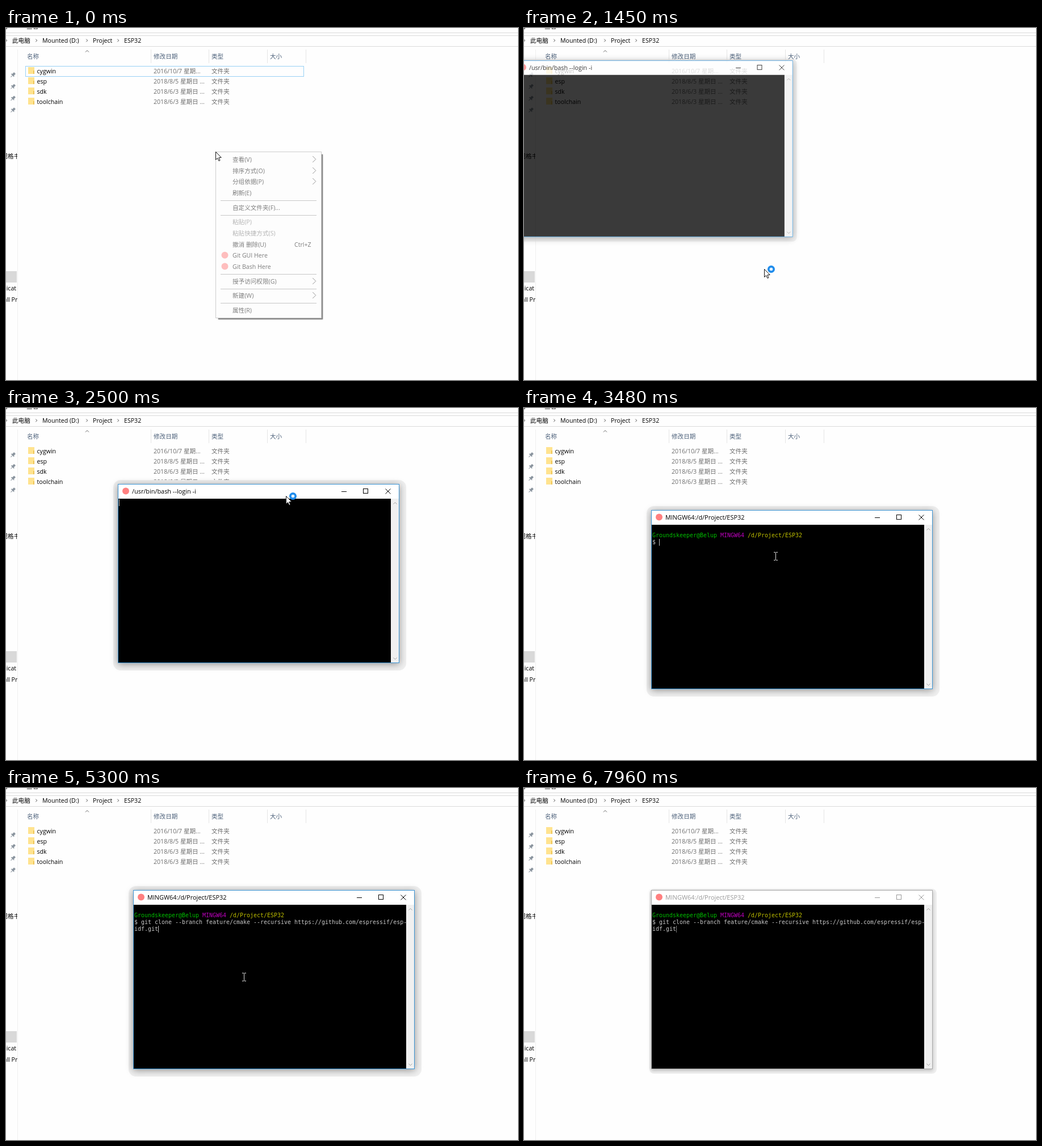
An HTML page with a canvas for the animation above (8.14 s loop, 902 px wide and 621 px high).

```html
<!DOCTYPE html>
<html lang="zh-CN">
<head>
<meta charset="utf-8">
<title>Git Bash</title>
<style>
html, body { margin: 0; width: 100%; height: 100%; overflow: hidden; background: #fefefe; }
canvas { display: block; }
</style>
</head>
<body>
<canvas id="stage" width="902" height="621"></canvas>
<script>
const W = 902, H = 621, LOOP = 8140;
const UI = '"Open Sans","Noto Sans CJK SC","Noto Sans CJK",sans-serif';
const MONO = '9.97px "DejaVu Sans Mono",monospace';
const LOGO = '#ff8080';
const page = document.getElementById('stage').getContext('2d');
const layer = Object.assign(document.createElement('canvas'), { width: W, height: H }).getContext('2d');
let g = page;

// Pointer moves: start, end, then the place reached
const MOVES = [
  [180, 790, 423, 425],   // to the menu entry
  [1430, 2140, 277, 76],  // to the title bar
  [2230, 2500, 493, 155], // drag
  [2680, 2950, 520, 201], // drag on
  [3040, 3400, 443, 261],
  [4220, 4760, 419, 333],
  [5310, 5750, 350, 268],
  [6210, 6570, 797, 583],
  [6760, 7120, 873, 640], // off the stage
];

const clamp = (v, lo, hi) => Math.min(hi, Math.max(lo, v));
const easeOut = k => 1 - (1 - k) ** 3;
const tick = t => t - (t - 70) % 90;

function pointerAt(t) {
  let x = 369, y = 218;
  for (const [start, end, toX, toY] of MOVES) {
    const k = easeOut(clamp((t - start) / (end - start), 0, 1));
    x += (toX - x) * k;
    y += (toY - y) * k;
  }
  return [Math.round(x), Math.round(y)];
}

function text(s, x, y, color = '#000', font = '10.6px ' + UI) {
  g.font = font;
  g.fillStyle = color;
  g.fillText(s, x, y);
}
function box(x, y, w, h, color) {
  g.fillStyle = color;
  g.fillRect(x, y, w, h);
}
function frame(x, y, w, h, color) {
  g.strokeStyle = color;
  g.lineWidth = 1;
  g.strokeRect(x + .5, y + .5, w - 1, h - 1);
}
function line(points, color) {
  g.beginPath();
  points.forEach(([x, y]) => g.lineTo(x, y));
  g.strokeStyle = color;
  g.lineWidth = 1;
  g.stroke();
}
function dot(x, y, r, color) {
  g.beginPath();
  g.arc(x, y, r, 0, 7);
  g.fillStyle = color;
  g.fill();
}
// Chevron centred on x, y, pointing along dx, dy
function chevron(x, y, dx, dy, size, color) {
  const a = size * dx / 2, b = size * dy / 2;
  line([[x - a - 2 * b, y - b - 2 * a], [x + a, y + b], [x - a + 2 * b, y - b + 2 * a]], color);
}

function pin(y) {
  g.save();
  g.translate(12, y);
  g.rotate(Math.PI / 4);
  box(-2, -5, 4, 5, '#8a949e');
  box(-3.5, -.5, 7, 1.5, '#8a949e');
  box(-.5, 0, 1, 5, '#8a949e');
  g.restore();
}

function drawExplorer(selected) {
  box(0, 0, W, H, '#fefefe');
  text('享', -4, 1);
  text('查看', 36, 1);
  for (const y of [8, 13, 32]) box(0, y, W, 1, '#dadada');
  [['此电脑', 11], ['Mounted (D:)', 64], ['Project', 153], ['ESP32', 208]].forEach(([name, x]) => {
    chevron(x - 10.5, 22, 1, 0, 2.4, '#555');
    text(name, x, 26);
  });

  box(20, 38, 1, H, '#f0f0f0');
  for (let i = 0; i < 4; i++) pin(83 + 20.7 * i);
  box(0, 429, 19, 20, '#d9d9d9');
  g.save();
  g.beginPath();
  g.rect(0, 0, 20, H);
  g.clip();
  text('规格书', -7.5, 230);
  text('licat', -2, 463);
  text('all Pr', -4.5, 483);
  g.restore();

  [['名称', 37], ['修改日期', 260], ['类型', 362], ['大小', 465], ['', 533]].forEach(([name, x], i) => {
    text(name, x, 54, '#4c607a');
    if (i) box(x - 5, 38, 1, 24, '#e5e5e5');
  });
  chevron(143, 41, 0, -1, 3, '#666');
  [['cygwin', '2016/10/7 星期...'], ['esp', '2018/8/5 星期日 ...'],
   ['sdk', '2018/6/3 星期日 ...'], ['toolchain', '2018/6/3 星期日 ...']].forEach(([name, date], i) => {
    const y = 80 + 18 * i;
    box(39, y - 11, 11, 12, '#ffe38f');
    box(48, y - 5, 2, 6, '#eec65a');
    text(name, 54.5, y);
    text(date, 260, y, '#6d6d6d');
    text('文件夹', 362, y, '#6d6d6d');
  });
  if (selected) frame(34, 67, 491, 19, '#99d1f5');
}

// Suffix: > submenu, - disabled, * with icon; an empty entry is a separator
const MENU = ['查看(V)>', '排序方式(O)>', '分组依据(P)>', '刷新(E)', '', '自定义文件夹(F)...', '',
  '粘贴(P)-', '粘贴快捷方式(S)-', '撤消 删除(U)', 'Git GUI Here*', 'Git Bash Here*', '',
  '授予访问权限(G)>', '', '新建(W)>', '', '属性(R)'];

function drawMenu(pointer, fading) {
  box(369, 218, 187, 294, fading ? '#fdfdfd' : '#f0f0f0');
  frame(369, 218, 187, 294, '#a0a0a0');
  let y = 232;
  for (const entry of MENU) {
    if (!entry) {
      box(378, Math.round(y - 6.7), 169, 1, '#919191');
      y += 6;
      continue;
    }
    const [, label, kind] = entry.match(/^(.*?)([>*-]?)$/);
    if (Math.abs(pointer[1] - y) < 9.8 && kind !== '-') box(372, Math.round(y - 9.7), 181, 20, '#d8d8d8');
    text(label, 399, Math.round(y + 4), kind === '-' ? '#6d6d6d' : '#000');
    if (kind === '>') chevron(543, Math.round(y) - .5, 1, 0, 5.5, '#333');
    if (kind === '*') dot(385.5, y - .5, 6, LOGO);
    if (label.startsWith('撤消')) text('Ctrl+Z', 508, Math.round(y + 4));
    y += 19.67;
  }
}

function drawTerminal(x, y, t) {
  const active = t < 7960, ready = t >= 3120, pasted = t >= 5110;
  const ink = active ? '#000' : '#999';
  const inset = active && t >= 1540 ? 0 : 5;
  g.beginPath();
  g.roundRect(x - 8 + inset, y - 7 + inset, 516 - 2 * inset, 336 - 2 * inset, 13 - inset);
  g.fillStyle = '#efefef';
  g.fill();
  g.save();
  g.shadowColor = active ? 'rgba(0,0,0,.4)' : 'rgba(0,0,0,.25)';
  g.shadowBlur = active ? 12 : 6;
  g.shadowOffsetY = 2;
  box(x, y, 496, 316, '#fff');
  g.restore();
  box(x + 1, y + 26, 480, 289, '#000');
  box(x + 481, y + 26, 14, 289, '#f0f0f0');
  chevron(x + 488.5, y + 34, 0, -1, 3, '#a0a0a0');
  chevron(x + 488.5, y + 308, 0, 1, 3, '#a0a0a0');
  frame(x, y, 496, 316, active ? '#3b95d6' : '#aaa');

  dot(x + 14, y + 12.5, 6, LOGO);
  text(ready ? 'MINGW64:/d/Project/ESP32' : '/usr/bin/bash --login -i', x + 25, y + 17, ink, '10.9px ' + UI);
  box(x + 394, y + 13, 9, 1, ink);
  frame(x + 432, y + 8, 9, 9, ink);
  line([[x + 471.5, y + 8.5], [x + 480.5, y + 17.5]], ink);
  line([[x + 480.5, y + 8.5], [x + 471.5, y + 17.5]], ink);

  const type = (s, col, row, color = '#c8c8c8') => text(s, x + 2 + 6 * col, y + 36 + 12 * row, color, MONO);
  if (ready) {
    type('Groundskeeper@Belup', 0, 1, '#00bf00');
    type('MINGW64', 20, 1, '#bf00bf');
    type('/d/Project/ESP32', 28, 1, '#bfbf00');
    type('$', 0, 2);
  }
  if (pasted) {
    type('git clone --branch feature/cmake --recursive https://github.com/espressif/esp-', 2, 2);
    type('idf.git', 0, 3);
  }
  const [col, row] = pasted ? [7, 3] : ready ? [2, 2] : [0, 0];
  const blink = Math.floor((t - (t < 4940 ? 3480 : 4930)) / 550) % 2;
  if (t < 3480 || !blink || !active) box(x + 2 + 6 * col, y + 27 + 12 * row, 1, 12, active ? '#bfbfbf' : '#777');
}

function drawArrow(x, y, busy) {
  g.beginPath();
  [[0, 0], [0, 14], [3, 11], [5.5, 16], [7.5, 15], [5.3, 10.3], [9.7, 10]]
    .forEach(([dx, dy]) => g.lineTo(x + .5 + dx, y + .5 + dy));
  g.closePath();
  g.fillStyle = '#fff';
  g.fill();
  g.strokeStyle = '#111';
  g.lineWidth = 1;
  g.stroke();
  if (!busy) return;
  dot(x + 12.5, y + .5, 6.5, '#1f8cec');
  dot(x + 12.5, y + .5, 2.8, '#e4f2ff');
}

function drawBeam(x, y) {
  box(x, y - 6, 1, 13, '#ddd');
  for (const dy of [-7, 7]) {
    box(x - 3, y + dy, 3, 1, '#ddd');
    box(x + 1, y + dy, 3, 1, '#ddd');
  }
}

// Draws into the spare canvas, then lays it over the page as one sheet
function withLayer(alpha, draw) {
  g = layer;
  g.clearRect(0, 0, W, H);
  g.save();
  draw();
  g.restore();
  g = page;
  g.globalAlpha = alpha;
  g.drawImage(layer.canvas, 0, 0);
  g.globalAlpha = 1;
}

function render() {
  const t = performance.now() % LOOP, held = tick(t);
  const pointer = pointerAt(held);
  const menuOpen = t < 1090, busy = !menuOpen && t < 2860;
  drawExplorer(menuOpen);

  if (menuOpen) {
    const fading = t < 90;
    g.save();
    g.shadowColor = '#888';
    g.shadowBlur = 2;
    box(374, 223, 184, 291, '#888');
    g.restore();
    box(369, 218, 187, 294, '#fefefe');
    withLayer(fading ? .5 : 1, () => drawMenu(pointer, fading));
  }

  // The window hangs on the pointer while it is dragged
  const [gripX, gripY] = pointerAt(clamp(held, 2140, 3000));
  const x = gripX - 296, y = gripY - 21;
  const alpha = clamp((held - 1270) / 195, 0, 1);
  if (alpha) withLayer(alpha, () => {
    const scale = .943 + .057 * alpha;
    g.translate(x + 248, y + 158);
    g.scale(scale, scale);
    g.translate(-x - 248, -y - 158);
    drawTerminal(x, y, t);
  });

  const [px, py] = pointer;
  const inside = px > x && px < x + 481 && py > y + 26 && py < y + 315;
  if (!menuOpen && !busy && inside) drawBeam(px, py);
  else drawArrow(px, py, busy);
  requestAnimationFrame(render);
}
render();
</script>
</body>
</html>
```
